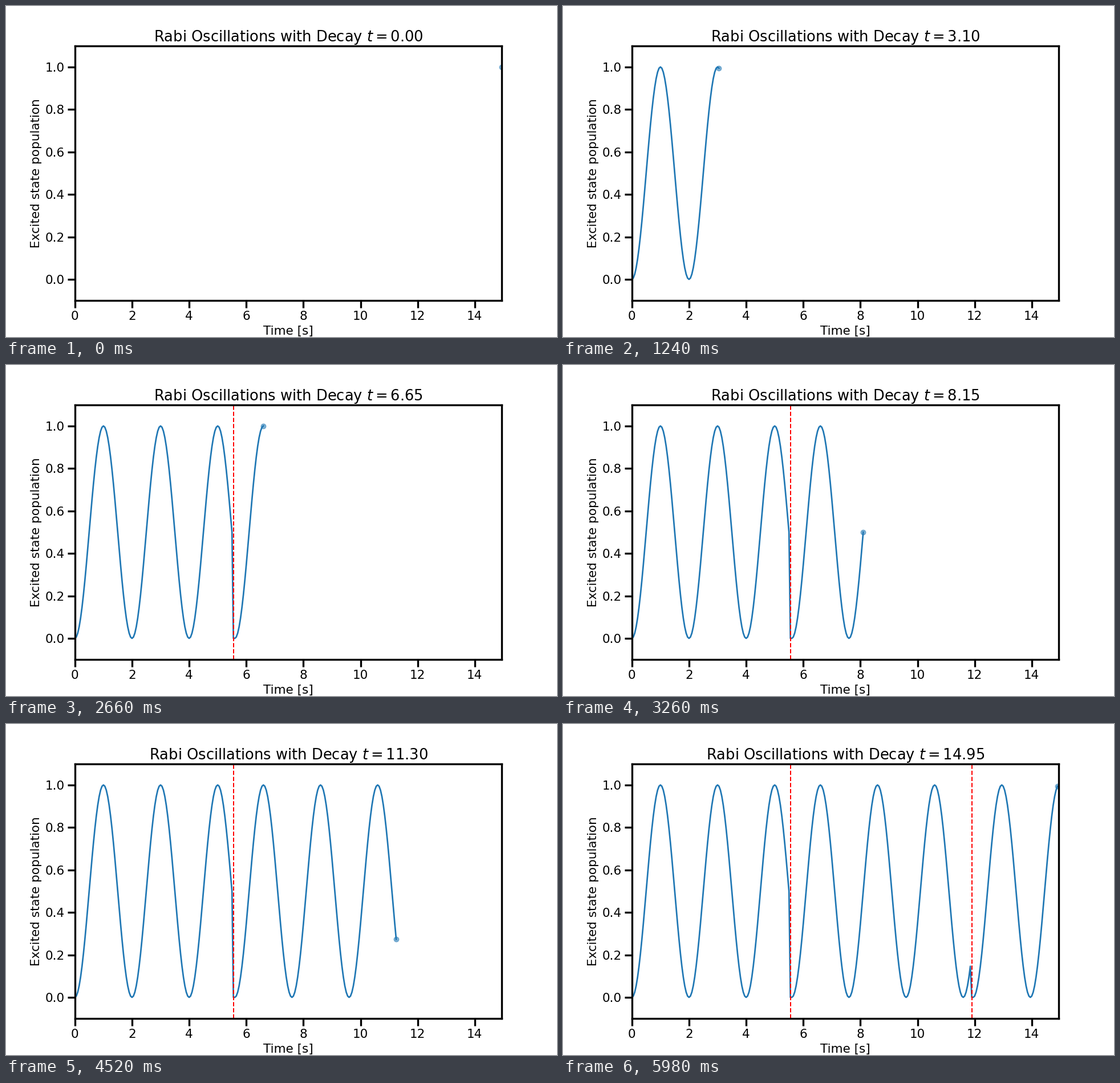
These frames come from a looping animation (966 px wide and 580 px high, 6 s). A matplotlib script:

```python
import numpy as np
import matplotlib.pyplot as plt
from matplotlib.animation import FuncAnimation

FRAMES, INTERVAL = 300, 20
DT = 0.05
DECAYS = (111, 238)  # sample indices at which the state collapses
K = 0.966            # point scale of the 966 x 580 stage

plt.rcParams.update({
    "font.family": "DejaVu Sans",
    "mathtext.fontset": "dejavusans",
    "font.size": 16 * K,
    "axes.linewidth": 2.5 * K,
    "axes.labelpad": 4 * K,
    "axes.titlepad": 6 * K,
})
for axis in ("xtick", "ytick"):
    plt.rcParams.update({
        f"{axis}.major.size": 10 * K,
        f"{axis}.major.width": 2.5 * K,
        f"{axis}.major.pad": 3.5 * K,
    })


def population(n):
    """Excited state population, restarting one step after each decay."""
    start = np.zeros_like(n)
    for d in DECAYS:
        start[n >= d] = d + 1
    phase = np.maximum(n - start, 0) * DT
    return np.sin(np.pi * phase / 2) ** 2


steps = np.arange(FRAMES)
t = steps * DT
p = population(steps)

fig, ax = plt.subplots(figsize=(9.66, 5.8), dpi=100)
ax.set(xlim=(0, t[-1]), ylim=(-0.1, 1.1),
       xlabel="Time [s]", ylabel="Excited state population")
title = ax.set_title("")
curve, = ax.plot([], [], color="C0", lw=2 * K)
dot = ax.scatter([t[-1]], [p[-1]], s=36 * K**2, lw=1.5 * K,
                 color="C0", alpha=0.5)
marks = [ax.axvline(t[d], color="red", ls="--", lw=1.5 * K, visible=False)
         for d in DECAYS]


def update(i):
    curve.set_data(t[:i], p[:i])
    dot.set_offsets([(t[i - 1], p[i - 1])])  # wraps to the last sample at i = 0
    for d, mark in zip(DECAYS, marks):
        mark.set_visible(i >= d)
    title.set_text(f"Rabi Oscillations with Decay $t = {t[i]:.2f}$")
    return [curve, dot, title, *marks]


anim = FuncAnimation(fig, update, frames=FRAMES, interval=INTERVAL,
                     repeat=True, repeat_delay=0, blit=False)
plt.show()
```
